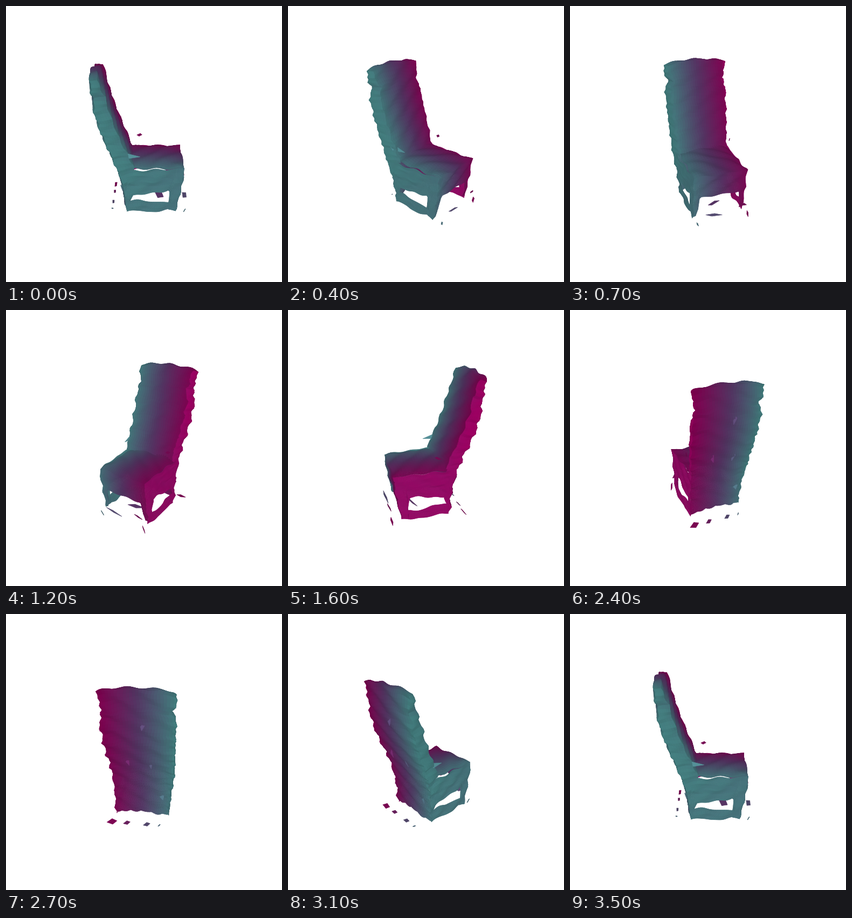
These frames come from a looping animation (512x512 px, 3.6 s). A matplotlib script:

```python
import numpy as np
import matplotlib.pyplot as plt
from matplotlib.animation import FuncAnimation
from matplotlib.collections import PolyCollection

SIZE, FRAMES, STEP = 512, 36, 100
DIST = 630                      # camera distance in pixels
TILT = np.radians(24.5)
SE, CE = np.sin(TILT), np.cos(TILT)
PINK, PLUM, TEAL = np.array([(118, 5, 78), (80, 50, 94), (65, 112, 117)]) / 255

# Model axes: a = depth of the chair (front positive), b = width, z = height.
quads, colors = [], []


def lerp(p, q, t):
    return p + (q - p) * t


def tint(b, gain):
    t = b / 52
    return lerp(PLUM, TEAL if t > 0 else PINK, min(abs(t), 1.1)) * gain


def scallop(z):
    return np.abs(np.sin(np.pi * z / 30)) + 0.5 * np.sin(z * 0.47)


def bumps(p):
    """Smooth displacement that depends on position only."""
    a, b, z = np.moveaxis(p, -1, 0)
    wave = [np.sin(0.21 * z + 0.11 * b), np.sin(0.19 * z - 0.13 * a),
            np.sin(0.17 * a + 0.15 * b + 0.12 * z)]
    return 1.4 * np.stack(wave, -1)


def half_width(u, z):
    waist = np.where(u > 0, -60, 10)
    notch = 7 * np.exp(-((z - 104) / 7) ** 2)
    return 53 + 5 * np.tanh((z - waist) / 40) - notch + 2 * scallop(z)


def spine(z):
    return -56 - 27 * np.tanh((z - 10) / 70)


def back(u, z):
    return spine(z) - 6 * (1 - u ** 4) - 2 * scallop(z) * u ** 4


def front(u, z):
    depth = 26 * np.sqrt(1 - ((z + 30) / 172) ** 2)
    return spine(z) + depth * (0.88 + 0.12 * u)


def top(u):
    return 140 - 6 * u * u


def rim(z):
    return 71 - 13 * (np.clip(-26 - z, 0, 90) / 90) ** 1.5


def add(quad, gain=1.0):
    quads.append(quad)
    colors.append(tint(quad[:, 1].mean(), gain))


def patch(shape, nu, nv, gain=1.0):
    """Cut the surface shape(u, v), u and v in 0..1, into quads."""
    u, v = np.meshgrid(np.linspace(0, 1, nu + 1), np.linspace(0, 1, nv + 1))
    p = np.stack(np.broadcast_arrays(*shape(u, v)), -1)
    p = p + bumps(p)
    for j in range(nv):
        for i in range(nu):
            add(np.array([p[j, i], p[j, i + 1], p[j + 1, i + 1], p[j + 1, i]]), gain)


def shard(center, half, h=4, gain=1.0):
    c, d, up = np.array(center), np.array(half), np.array([h * .6, 0, h])
    add(np.array([c - d, c + up, c + d, c + d * .2 - up]), gain)


def rear(u, v):
    u = 2 * u - 1
    low = -104 - 7 * u * u - 3 * np.abs(np.sin(8 * u))
    z = lerp(low, top(u), v)
    return back(u, z), u * half_width(u, z), z


def backrest(u, v):
    u = 2 * u - 1
    z = lerp(-22, top(u), v)
    return front(u, z), u * (half_width(u, z) - 6), z


def cap(u, v):
    u = 2 * u - 1
    z = top(u)
    return lerp(back(u, z), front(u, z), v), u * (half_width(u, z) - 6 * v), z


def seat(u, v):
    u = 2 * u - 1
    return lerp(-27, 71, v), u * 48, -19 - 7 * np.maximum(u ** 4, v ** 6)


def apron(u, v):
    u = 2 * u - 1
    leg = np.clip((np.abs(u) - .77) / .1, 0, 1)
    z = lerp(-26, lerp(-70 + 4 * u * u, -110, leg), v)
    return rim(z), u * 48, z


def wing(side):
    def shape(u, v):
        z = lerp(-27, top(1), v)
        w = half_width(side, z) - 6 * u * u
        return lerp(back(side, z), front(side, z), u), side * w, z
    return shape


def strip(side, high, low):
    """Part of a lower side wall between the heights high(u) and low(u)."""
    def shape(u, v):
        z = lerp(high(u), low(u), v)
        b = lerp(half_width(side, z), 48, u)
        return lerp(back(side, z), rim(z), u), side * b, z
    return shape


def skirt(u):
    leg = np.clip(np.maximum((.12 - u) / .1, (u - .8) / .06), 0, 1)
    return lerp(-81 + 14 * u, -114, leg)


def build():
    patch(rear, 26, 44)
    patch(backrest, 22, 28)
    patch(cap, 26, 2)
    patch(seat, 22, 18)
    patch(apron, 36, 7)
    for side, gain, drop in [(1, 1.02, 0), (-1, 1.22, 5)]:
        patch(wing(side), 6, 32, gain)
        patch(strip(side, lambda u: -26 + 0 * u, skirt), 36, 10, gain)
        patch(strip(side, lambda u: -93 - drop + 3 * np.sin(7 * u),
                    lambda u: -115 - drop / 2 + 2 * np.sin(9 * u)), 28, 4, gain)

    # spike on the teal edge
    add(np.array([(-7, 49, -2), (-36, 51, 7), (-40, 52, 0), (-36, 51, -6)]), 1.25)

    # loose pieces: a row behind, then front and inside
    for b, size in [(-52, 9), (-24, 6), (13, 6), (36, 2)]:
        shard((-60, b, -118), (2, size, 1), size / 2)
    shard((-9, -46, -1), (5, 2, 1), 3)
    shard((76, 44, -117), (1, 2, 5), 3)
    shard((80, -41, -90), (2, 7, 4))
    shard((78, -51, -114), (1, 2, 8))
    shard((78, 14, -102), (2, 16, 5), 5, 1.15)
    shard((30, -2, -111), (8, 14, 3), 7, 1.1)

    # light dabs on the rear face
    for u, v in [(.57, .76), (.33, .47), (.67, .45), (.87, .16)]:
        du, dv = np.array([-.03, .02, .03, 0]), np.array([0, .03, .02, -.03])
        quad = np.stack(rear(u + du, v + dv), -1)
        add(quad + bumps(quad) - [2, 0, 0], 1.25)


build()
mesh, base = np.array(quads, float), np.array(colors)
normal = np.cross(mesh[:, 2] - mesh[:, 0], mesh[:, 3] - mesh[:, 1])
normal /= np.linalg.norm(normal, axis=1, keepdims=True) + 1e-9

fig = plt.figure(figsize=(SIZE / 100, SIZE / 100), dpi=100, facecolor="white")
ax = fig.add_axes([0, 0, 1, 1])
ax.set(xlim=(0, SIZE), ylim=(SIZE, 0))
ax.axis("off")
body = PolyCollection([], linewidths=0.5)
ax.add_collection(body, autolim=False)


def draw(k):
    angle = 2 * np.pi * k / (FRAMES - 1)
    c, s = np.cos(angle), np.sin(angle)
    a, b, z = np.moveaxis(mesh, -1, 0)
    x, d = a * c - b * s, a * s + b * c
    near = d * CE + z * SE
    scale = DIST / (DIST - near)
    points = np.stack([256 + scale * x, 256 - scale * (z * CE - d * SE)], -1)

    facing = np.abs(normal @ np.array([s * CE, c * CE, SE]))
    rgb = np.clip(base * (0.86 + 0.2 * facing)[:, None], 0, 1)
    order = np.argsort(near.mean(axis=1))
    body.set_verts(points[order])
    body.set_facecolor(rgb[order])
    body.set_edgecolor(rgb[order])
    return [body]


anim = FuncAnimation(fig, draw, frames=FRAMES, interval=STEP,
                     repeat=True, repeat_delay=0, blit=False)
plt.show()
```
